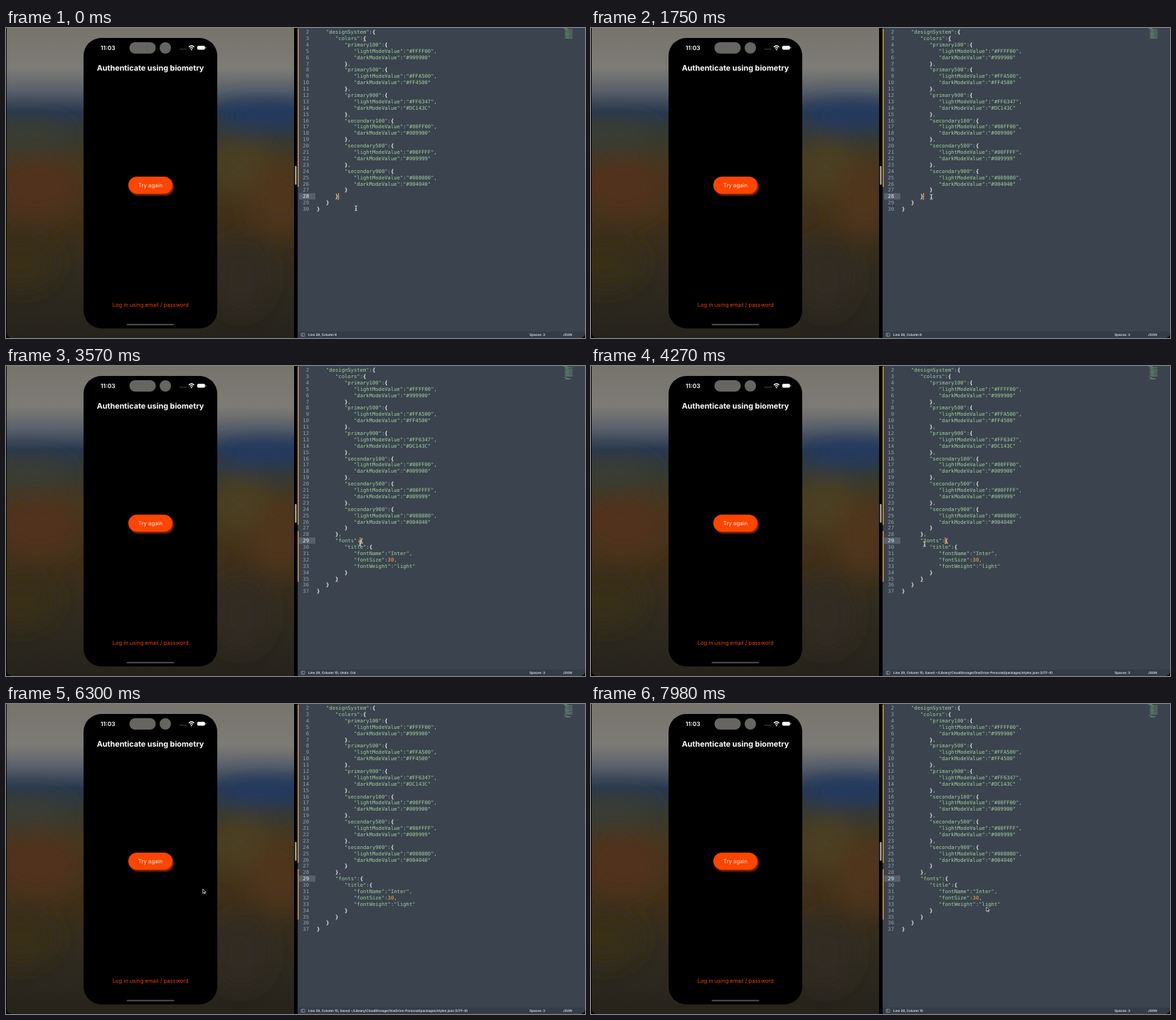
An HTML page for the animation above (8 s loop, 814 px wide and 436 px high).

```html
<!DOCTYPE html>
<html lang="en">
<head>
<meta charset="utf-8">
<title>Design tokens demo</title>
<style>
  html, body { margin: 0; width: 100%; height: 100%; overflow: hidden; background: #000; }
  svg { display: block; width: 100%; height: 100%; }
  text { white-space: pre; text-rendering: geometricPrecision; }
  .ui text { font-family: Inter, sans-serif; }
  .code text { font: 7.2px "DejaVu Sans Mono", monospace; }
  .status text { font: 600 4.6px Inter, sans-serif; fill: #e4e7eb; }
  .mid { text-anchor: middle; }
</style>
</head>
<body>
<svg id="stage" viewBox="0 0 814 436" xmlns="http://www.w3.org/2000/svg">
  <defs>
    <linearGradient id="sky" x2="0" y2="1">
      <stop offset="0" stop-color="#77746c"/>
      <stop offset=".13" stop-color="#7d7b76"/>
      <stop offset=".2" stop-color="#5c616a"/>
      <stop offset=".27" stop-color="#29394f"/>
      <stop offset=".35" stop-color="#36392f"/>
      <stop offset=".45" stop-color="#453820"/>
      <stop offset=".62" stop-color="#403019"/>
      <stop offset=".8" stop-color="#2f2b1f"/>
      <stop offset="1" stop-color="#26231c"/>
    </linearGradient>
    <filter id="soft" x="-60%" y="-60%" width="220%" height="220%"><feGaussianBlur stdDeviation="16"/></filter>
    <filter id="shade" x="-20%" y="-40%" width="140%" height="180%"><feGaussianBlur stdDeviation="1.2"/></filter>
    <clipPath id="left"><path d="M1 0H405V436H9Q1 436 1 428Z"/></clipPath>
  </defs>

  <g clip-path="url(#left)">
    <rect width="405" height="436" fill="url(#sky)"/>
    <g filter="url(#soft)">
      <ellipse cx="365" cy="122" rx="70" ry="18" fill="#213a63"/>
      <ellipse cx="30" cy="150" rx="60" ry="18" fill="#3b3e34"/>
      <ellipse cx="45" cy="225" rx="60" ry="42" fill="#51301a"/>
      <ellipse cx="330" cy="195" rx="40" ry="36" fill="#4b4120"/>
      <ellipse cx="385" cy="240" rx="42" ry="50" fill="#50351a"/>
      <ellipse cx="20" cy="330" rx="50" ry="36" fill="#392d19"/>
      <ellipse cx="330" cy="350" rx="40" ry="50" fill="#302c20"/>
    </g>
  </g>

  <g class="ui">
    <rect x="109" y="14" width="188" height="408.500" rx="25"/>
    <rect x="173.500" y="20" width="37" height="16" rx="8" fill="#666562"/>
    <circle cx="224" cy="28" r="8" fill="#666562"/>
    <text x="133" y="31" font-size="8.400" font-weight="600" fill="#fff">11:03</text>
    <g fill="#777">
      <circle cx="245" cy="29.800" r=".7"/><circle cx="247.600" cy="29.800" r=".7"/>
      <circle cx="250.200" cy="29.800" r=".7"/><circle cx="252.800" cy="29.800" r=".7"/>
    </g>
    <g fill="none" stroke="#fff" stroke-width="1.300">
      <path d="M257 26.700Q260.800 23.300 264.600 26.700M258.700 28.600Q260.800 26.800 262.900 28.600"/>
      <path d="M260.800 31.200L259.800 30H261.800Z" stroke-width=".6" fill="#fff"/>
    </g>
    <rect x="268.800" y="25" width="11" height="5.600" rx="1.800" fill="#fff"/>
    <rect x="280.400" y="26.800" width=".9" height="2" rx=".4" fill="#aaa"/>
    <text class="mid" x="203" y="60" font-size="10.800" font-weight="700" fill="#fff">Authenticate using biometry</text>
    <rect x="174" y="211.500" width="62" height="24" rx="12" fill="#8a2a08" filter="url(#shade)"/>
    <rect x="172" y="209" width="62" height="24" rx="12" fill="#fb4500"/>
    <text class="mid" x="203" y="223.800" font-size="7.800" fill="#ffe6da">Try again</text>
    <text class="mid" x="203.200" y="391.500" font-size="7.620" fill="#ea4210">Log in using email / password</text>
    <rect x="169.500" y="416" width="67" height="2.200" rx="1.100" fill="#454545"/>
  </g>

  <rect x="405" width="5" height="436"/>
  <rect x="406.200" y="194" width="2.400" height="26.500" rx="1.200" fill="#a9a9a9"/>

  <path d="M410 0H814V428Q814 436 806 436H410Z" fill="#3a434e"/>
  <g id="marks" fill="#eba951"></g>
  <rect id="gutter" x="412" width="23" height="8.900" fill="#55616d"/>
  <g id="selection" fill="#596775"></g>
  <g id="code" class="code"></g>
  <g id="underlines" fill="#d3a05a"></g>
  <rect id="caret" width="1" height="9.400" fill="#f9ae58"/>
  <g id="minimap"></g>

  <path d="M410 427H814V428Q814 436 806 436H410Z" fill="#343c46"/>
  <g class="status">
    <rect x="415" y="429.200" width="5" height="4.400" rx=".7" fill="none" stroke="#aeb4bb" stroke-width=".6"/>
    <path d="M416.800 429.200V433.600" stroke="#aeb4bb" stroke-width=".6"/>
    <text id="status" x="425" y="433.100"></text>
    <text x="736" y="433.100">Spaces: 3</text>
    <text x="783" y="433.100">JSON</text>
  </g>

  <path id="beam" d="M-1.800 -3.400Q0 -3.400 0 -2.300Q0 -3.400 1.800 -3.400M0 -2.600V2.600M-1.800 3.400Q0 3.400 0 2.300Q0 3.400 1.800 3.400M-1 .8H1"
        fill="none" stroke="#eef0f2" stroke-width=".85"/>
  <path id="arrow" d="M0 0V6.100L1.400 4.800L2.300 6.900L3.300 6.500L2.400 4.400H4.300Z" fill="#000" stroke="#fff" stroke-width=".7"/>
</svg>

<script>
const LOOP = 8000, CHAR = 4.334, ROW = 8.893, LEFT = 437;
const UNDO = 1820, CLICK = 2900, SAVE = 3640, BLUR = 4970, SAVE_END = 7630;

const $ = id => document.getElementById(id);
const colX = col => LEFT + col * CHAR;
const rowY = line => 5.5 + (line - 2) * ROW;

function add(parent, tag, attrs, content) {
  const el = document.createElementNS('http://www.w3.org/2000/svg', tag);
  for (const key in attrs) el.setAttribute(key, attrs[key]);
  if (content) el.textContent = content;
  parent.appendChild(el);
  return el;
}

const palette = [
  ['primary100', 'FFFF00', '999900'], ['primary500', 'FFA500', 'FF4500'],
  ['primary900', 'FF6347', 'DC143C'], ['secondary100', '00FF00', '009900'],
  ['secondary500', '00FFFF', '009999'], ['secondary900', '008080', '004040']
];

// Each entry is [indent, text]; the first one is line 2.
const head = [[3, '"designSystem":{'], [6, '"colors":{']];
palette.forEach(([name, light, dark], i) => head.push(
  [9, `"${name}":{`],
  [12, `"lightModeValue":"#${light}",`],
  [12, `"darkModeValue":"#${dark}"`],
  [9, i < palette.length - 1 ? '},' : '}']
));
const fonts = [
  [6, '"fonts":{'], [9, '"title":{'], [12, '"fontName":"Inter",'], [12, '"fontSize":30,'],
  [12, '"fontWeight":"light"'], [9, '}'], [6, '}']
];
const tail = [[3, '}'], [0, '}']];
const docs = {
  short: [...head, [6, '}'], ...tail],
  long: [...head, [6, '},'], ...fonts, ...tail]
};

function tokenColor(tok) {
  if (/[{}]/.test(tok)) return '#f2f4f6';
  if (/\d/.test(tok) && tok[0] !== '"') return '#f9ae58';
  return tok[0] === '"' ? '#a3cf9f' : '#b3c4c4';
}

function buildDoc(lines) {
  const code = add($('code'), 'g', {}), map = add($('minimap'), 'g', {});
  const numbers = lines.map(([indent, str], i) => {
    const y = rowY(i + 2) + 2.6;
    const text = add(code, 'text', { x: colX(indent), y });
    for (const tok of str.match(/"[^"]*"|[{}]|\d+|./g)) {
      add(text, 'tspan', { fill: tokenColor(tok), 'font-weight': /[{}]/.test(tok) ? 700 : 400 }, tok);
    }
    add(map, 'rect', {
      x: 782 + indent * .38, y: i * .59, width: str.length * .38, height: .45,
      fill: str.length > 3 ? '#7fae85' : '#8b949c', opacity: .8
    });
    return add(code, 'text', { x: 426, y, 'text-anchor': 'end' }, String(i + 2));
  });
  return { code, map, numbers };
}
const views = { short: buildDoc(docs.short), long: buildDoc(docs.long) };

// Selected block: the comma after the colors, then the fonts section.
const minimapSelection = add($('minimap'), 'path', { d: 'M784.500 15.400H795V19.500H789L787 22H782V16Z', fill: '#71808a', opacity: .85 });
[[6, '},'], ...fonts].forEach(([indent, str], i, all) => {
  const from = i ? 0 : 7, last = i === all.length - 1;
  const end = indent + str.length + (last ? 0 : 1);
  const line = 28 + i;
  add($('selection'), 'rect', {
    x: colX(from), y: rowY(line) - ROW / 2, width: (end - from) * CHAR, height: ROW + .1, rx: 1.2
  });
  for (let c = 0; i && c < indent; c++) {
    add($('selection'), 'circle', { cx: colX(c + .5), cy: rowY(line), r: .4, fill: '#8793a0' });
  }
});

const mark = (from, to) => add($('marks'), 'rect', {
  x: 410, y: rowY(from) - ROW / 2, width: 1.3, height: (to - from + 1) * ROW
});
mark(2, 26);
const newMark = mark(28, 35);

const underline = (line, col) => add($('underlines'), 'rect', {
  x: colX(col), y: rowY(line) + 3.7, width: CHAR, height: .7
});
const colorPair = [underline(3, 15), underline(28, 6)];
const fontPair = [underline(29, 14), underline(35, 6)];

const path = [
  [0, 492, 253.5], [350, 492, 253.5], [1050, 478.5, 237.5], [2310, 478.5, 237.5], [2600, 497.5, 250],
  [4130, 498, 249.5], [4740, 284, 256.7], [5700, 284, 256.7], [5880, 276.8, 260.2],
  [6650, 276.8, 260.2], [7920, 556, 285.6], [LOOP, 556, 285.6]
];

function pointerAt(t) {
  const i = path.findIndex(p => p[0] > t);
  const [t0, x0, y0] = path[i - 1], [t1, x1, y1] = path[i];
  const u = (t - t0) / (t1 - t0), e = u * u * (3 - 2 * u);
  return [x0 + (x1 - x0) * e, y0 + (y1 - y0) * e];
}

const show = (el, on) => el.setAttribute('visibility', on ? 'visible' : 'hidden');

function statusText(t) {
  if (t < UNDO) return 'Line 28, Column 8';
  if (t < CLICK) return '8 lines, 147 characters selected; Undo: Cut';
  const place = 'Line 29, Column 15';
  if (t < SAVE) return place + '; Undo: Cut';
  if (t < SAVE_END) return place + '; Saved ~/Library/CloudStorage/OneDrive-Personal/packages/styles.json (UTF-8)';
  return place;
}

function render(t) {
  const pasted = t >= UNDO, selected = pasted && t < CLICK, focused = t < BLUR;
  const [line, col] = !pasted ? [28, 7] : selected ? [35, 7] : [29, 14];
  const active = pasted ? views.long : views.short;

  for (const view of Object.values(views)) {
    const display = view === active ? 'inline' : 'none';
    view.code.setAttribute('display', display);
    view.map.setAttribute('display', display);
  }
  active.numbers.forEach((el, i) => el.setAttribute('fill', i + 2 === line ? '#f0f2f4' : '#9aa3ac'));
  $('gutter').setAttribute('y', rowY(line) - ROW / 2);
  show(newMark, pasted);
  show($('selection'), selected);
  show(minimapSelection, selected);
  colorPair.forEach(el => show(el, !pasted));
  fontPair.forEach(el => show(el, pasted && !selected && focused));

  $('caret').setAttribute('x', colX(col) - .2);
  $('caret').setAttribute('y', rowY(line) - 4.7);
  show($('caret'), focused);

  const status = statusText(t);
  if ($('status').textContent !== status) $('status').textContent = status;

  const [x, y] = pointerAt(t), beam = x > 410 && focused;
  const pointer = $(beam ? 'beam' : 'arrow');
  pointer.setAttribute('transform', `translate(${x} ${y})`);
  show($('beam'), beam);
  show($('arrow'), !beam);
}

const start = performance.now();
function tick() {
  render((performance.now() - start) % LOOP);
  requestAnimationFrame(tick);
}
tick();
</script>
</body>
</html>
```
